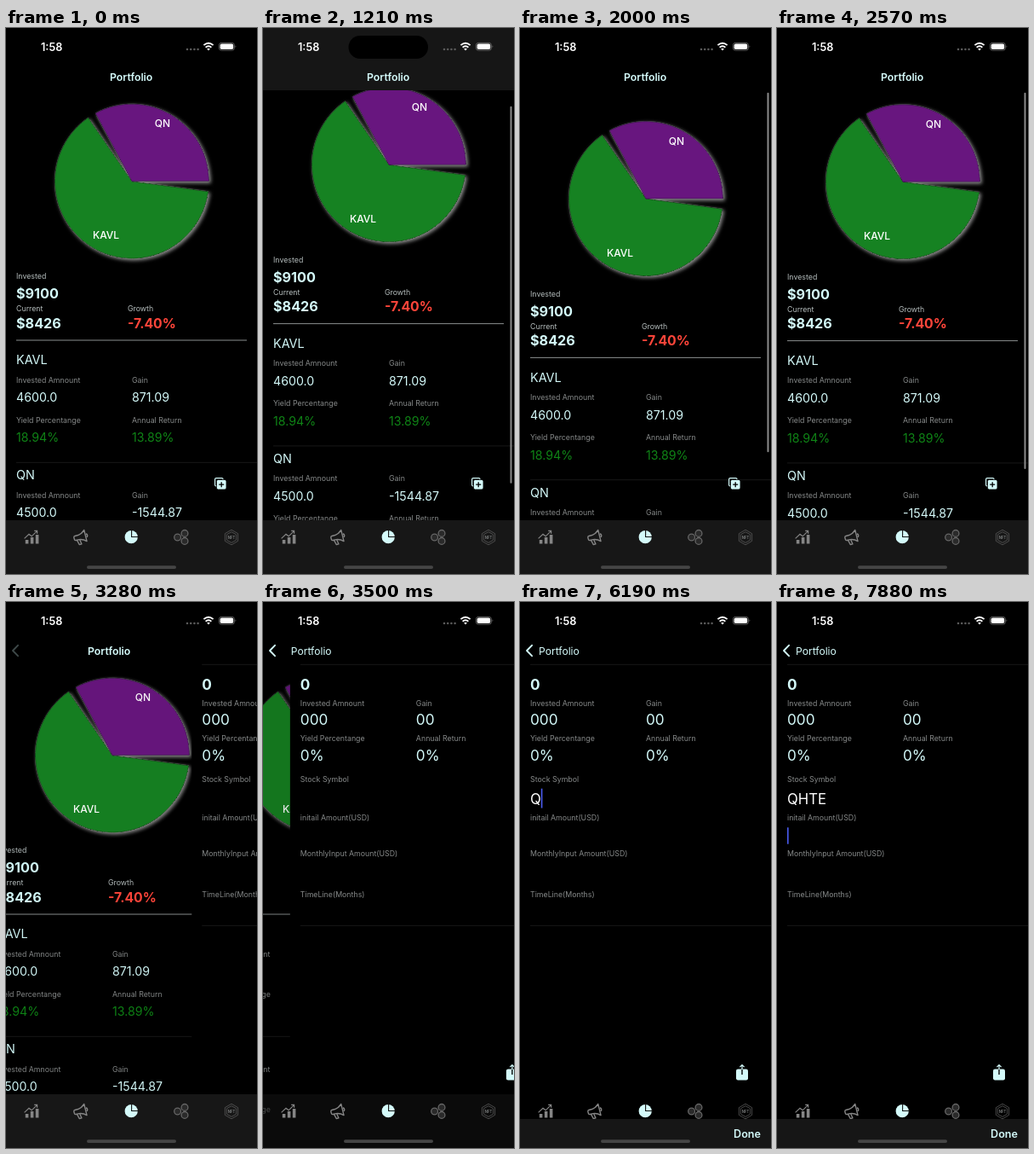
Recreate the animation shown at these times as an HTML page. Size 295 by 640 pixels, loop 8000 ms.

```html
<!DOCTYPE html>
<html lang="en">
<head>
<meta charset="utf-8">
<title>Portfolio</title>
<style>
  html, body { margin: 0; width: 100%; height: 100%; overflow: hidden; background: #000; }
  svg { display: block; width: 295px; height: 640px; }
  text { font-family: Inter, Roboto, sans-serif; fill: #d4fafa; white-space: pre; }
  .label { fill: #858888; }
  .soft { fill: #b4bcbc; }
  .bold { font-weight: 700; }
  .semi { font-weight: 600; }
  .medium { font-weight: 500; }
  .white { fill: #fff; }
  .red { fill: #ff453a; font-weight: 700; }
  .loss { fill: #ff453a; }
  .gain { fill: #0f8416; }
  .line { stroke: #1f1f1f; stroke-width: .8; }
</style>
</head>
<body>
<svg viewBox="0 0 295 640">
  <defs>
    <filter id="glow" x="-20%" y="-20%" width="140%" height="140%">
      <feDropShadow dx="1.8" dy="1.8" stdDeviation="2.1" flood-color="#fff" flood-opacity=".55"/>
    </filter>
  </defs>
  <rect width="295" height="640"/>

  <g id="home">
    <g id="list"></g>
    <rect id="bar" x="290.5" width="2" rx="1" fill="#8c8c8c"/>
    <g id="add">
      <rect x="245.6" y="527.6" width="9.4" height="9.4" rx="1.4" fill="#000" stroke="#d4fafa" stroke-width="1.2"/>
      <rect x="247.4" y="529.4" width="11.6" height="11.6" rx="2" fill="#d4fafa" stroke="#000" stroke-width=".8"/>
      <path d="M253.2 532.2v6M250.2 535.2h6" stroke="#000" stroke-width="1.3"/>
    </g>
  </g>

  <g id="detail">
    <rect width="295" height="640"/>
    <path class="line" d="M12 73.3H295M12 379.3H295"/>
    <rect id="caret" width="1.6" fill="#4a5cf0"/>
    <rect x="254" y="547.5" width="14" height="13" rx="2.2" fill="#d4fafa"/>
    <path d="M261 548v6" stroke="#000" stroke-width="1.4"/>
    <path d="M261 548v-5M258.4 545.2l2.6-2.6 2.6 2.6" fill="none" stroke="#d4fafa" stroke-width="1.2"/>
  </g>

  <rect id="navBg" width="295" height="73" fill="#161616"/>
  <rect x="100.5" y="9" width="93.5" height="27" rx="13.5"/>
  <g id="status">
    <g fill="#5a5a5a">
      <circle cx="213" cy="25" r="1.3"/><circle cx="217.2" cy="25" r="1.3"/>
      <circle cx="221.4" cy="25" r="1.3"/><circle cx="225.6" cy="25" r="1.3"/>
    </g>
    <path d="M232.4 20.2Q238 15.2 243.6 20.2M234.6 22.7Q238 19.8 241.4 22.7" fill="none" stroke="#fff" stroke-width="1.8"/>
    <path d="M236.2 24.4Q238 23 239.8 24.4L238 26.4Z" fill="#fff"/>
    <rect x="250.4" y="17.4" width="18" height="8.8" rx="2.8" fill="none" stroke="#777" stroke-width=".8"/>
    <rect x="251.6" y="18.6" width="15.6" height="6.4" rx="1.8" fill="#fff"/>
    <path d="M269.6 20.3q1.6 1.5 0 3z" fill="#777"/>
  </g>
  <path id="back" d="M14 50.8L8 57l6 6.2" fill="none" stroke="#d4fafa" stroke-width="1.9" stroke-linecap="round" stroke-linejoin="round"/>

  <rect id="tabBg" y="577" width="295" height="63" fill="#171717"/>
  <g id="tabs">
    <path d="M22.8 600h3.6v4.6h-3.6zM28.8 597h3.6v7.6h-3.6zM34.8 594h3.6v10.6h-3.6z" fill="#858585"/>
    <path d="M21.6 598.4l5.4-5 3.2 2.4 6-6M33.2 589.4h3.4v3.4" fill="none" stroke="#858585" stroke-width="1.2"/>
    <path transform="rotate(-14 88 597)" fill="none" stroke="#858585" stroke-width="1.4" stroke-linejoin="round"
      d="M81.5 593.8h3.8q4.8-.5 8.4-4.2v13.6q-3.6-3.7-8.4-4.2h-3.8q-1.5 0-1.5-1.5v-2.2q0-1.5 1.5-1.5zM82.8 599.2l1.4 5.6h2.8l-1-5.4M95 594.2q2 2.2 0 4.4"/>
    <circle cx="147.2" cy="596.7" r="7.6" fill="#d4fafa"/>
    <path d="M147.6 588V596.5H156" fill="none" stroke="#111" stroke-width="1.1"/>
    <g fill="#2a2a2a" stroke="#666" stroke-width="1.3">
      <circle cx="201.6" cy="597" r="3.9"/><circle cx="210" cy="592.4" r="3.9"/><circle cx="210" cy="601.4" r="3.9"/>
    </g>
    <path d="M265 588.2l7.6 4.4v8.8l-7.6 4.4-7.6-4.4v-8.8zM265 590.6l5.6 3.2v6.4l-5.6 3.2-5.6-3.2v-6.4z" fill="none" stroke="#5a5a5a" stroke-width=".8"/>
  </g>

  <g id="tools"><rect y="640" width="295" height="34" fill="#161616"/></g>
  <rect x="95" y="630.2" width="105" height="3.8" rx="1.9" fill="#454545"/>
</svg>

<script>
const LOOP = 8000, WIDTH = 295;
const $ = id => document.getElementById(id);
const NS = 'http://www.w3.org/2000/svg';

function make(parent, tag, attrs) {
  const el = document.createElementNS(NS, tag);
  for (const k in attrs) el.setAttribute(k, attrs[k]);
  parent.appendChild(el);
  return el;
}

// y is the middle of the capitals
function text(parent, x, y, size, str, cls = '', anchor = 'start') {
  const el = make(parent, 'text', { x, y: y + size * .364, 'font-size': size, class: cls, 'text-anchor': anchor });
  el.textContent = str;
  return el;
}

function slice(parent, from, to, fill, edge) {
  const at = a => `${148 + 90.5 * Math.cos(a * Math.PI / 180)} ${179.7 + 90.5 * Math.sin(a * Math.PI / 180)}`;
  const d = `M148 179.7L${at(from)}A90.5 90.5 0 ${to - from > 180 ? 1 : 0} 1 ${at(to)}Z`;
  make(parent, 'path', { d, fill, stroke: edge, 'stroke-width': 1 });
}

const list = $('list'), detail = $('detail');

function holding(y, name, values, cls) {
  text(list, 12, y, 14.4, name);
  [['Invested Amnount', 'Gain'], ['Yield Percentange', 'Annual Return']].forEach((row, r) =>
    row.forEach((label, c) => {
      const x = c ? 148 : 12, top = y + 23.3 + r * 47;
      text(list, x, top, 8.8, label, 'label');
      text(list, x, top + 20.7, 14.2, values[r * 2 + c], r ? cls : '');
    }));
  make(list, 'path', { d: `M12 ${y + 120.3}H295`, class: 'line' });
}

function buildList() {
  const pie = make(list, 'g', { filter: 'url(#glow)' });
  slice(pie, 7.7, 235.4, '#178223', '#0e5017');
  slice(pie, 241.8, 360, '#68187f', '#401050');
  text(list, 184, 112, 12, 'QN', 'medium white', 'middle');
  text(list, 117.5, 243, 12, 'KAVL', 'medium white', 'middle');
  text(list, 12, 291, 8.8, 'Invested', 'soft');
  text(list, 12, 311.5, 16.2, '$9100', 'bold');
  text(list, 12, 329, 8.8, 'Current', 'soft');
  text(list, 12, 346, 16.2, '$8426', 'bold');
  text(list, 143, 329, 8.8, 'Growth', 'soft');
  text(list, 143, 346, 15.8, '-7.40%', 'red');
  make(list, 'path', { d: 'M12 366H283', stroke: '#8a8f8f', 'stroke-width': 1 });
  holding(389, 'KAVL', ['4600.0', '871.09', '18.94%', '13.89%'], 'gain');
  holding(524, 'QN', ['4500.0', '-1544.87', '-34.33%', '-27.06%'], 'loss');
}

function buildDetail() {
  text(detail, 12, 97, 17.2, '0', 'bold');
  [[12, 118.5, 'Invested Amnount', '000'], [148, 118.5, 'Gain', '00'],
   [12, 160, 'Yield Percentange', '0%'], [148, 160, 'Annual Return', '0%']].forEach(([x, y, label, value]) => {
    text(detail, x, y, 8.8, label, 'label');
    text(detail, x, y + 19.7, 17.2, value);
  });
  [[207.5, 'Stock Symbol'], [253, 'initail Amount(USD)'],
   [295, 'MonthlyInput Amount(USD)'], [343, 'TimeLine(Months)']]
    .forEach(([y, label]) => text(detail, 12, y, 8.8, label, 'label'));
}

buildList();
buildDetail();
const field = text(detail, 12, 230.7, 16.7, '', 'white');
const svg = document.querySelector('svg');
const title = text(svg, 0, 57.2, 12.3, 'Portfolio', 'semi');
text($('status'), 41, 22, 12.7, '1:58', 'semi white');
text($('tabs'), 265, 597, 4.2, 'NFT', 'semi label', 'middle');
text($('tools'), 283, 657, 12.6, 'Done', 'semi', 'end');

// Each track is a list of [start time, held value]
const tracks = {
  scroll: [[0, 0], [1210, 19.4], [1330, 41], [1450, 47], [1770, 38], [1890, 6], [2000, -20.4],
           [2120, -17], [2230, -10], [2340, -5], [2450, -2], [2570, -.6], [3050, 0]],
  bar: [[0, 0], [1210, 1], [3050, 0]],
  left: [[0, 1], [3280, .74], [3390, .33], [3500, .108], [3610, .03], [3710, .003], [4000, 0]],
  tab: [[0, 1], [3390, .7], [3500, .5], [3610, .2], [3710, 0]],
  tools: [[0, 0], [5110, 13], [5220, 24], [5340, 30], [5450, 32.5], [5560, 33.6], [5660, 34]],
  typed: [[0, 0], [6190, 1], [6380, 3], [6580, 4]],
  caret: [[0, 0], [4990, 1], [5800, 0], [6190, 1], [7730, 0], [7880, 2]]
};

function held(name, t) {
  let value;
  for (const [start, v] of tracks[name]) if (t >= start) value = v;
  return value;
}

const move = (el, x, y) => el.setAttribute('transform', `translate(${x} ${y})`);

function render(t) {
  const scroll = held('scroll', t), left = held('left', t), caret = held('caret', t);

  move(list, 0, -scroll);
  move($('home'), -.3 * WIDTH * (1 - left), 0);
  $('home').style.opacity = .9 + .1 * left;
  move(detail, WIDTH * left, 0);
  $('navBg').style.opacity = scroll > 0 ? 1 : 0;
  $('tabBg').style.opacity = held('tab', t);

  const bar = $('bar');
  bar.style.opacity = held('bar', t);
  bar.setAttribute('y', 75.7 + Math.max(0, scroll) * .83);
  bar.setAttribute('height', 442 + Math.min(0, scroll));

  title.setAttribute('x', 22 + 100 * left);
  title.setAttribute('font-size', left > .5 ? 12.3 : 12.1);
  title.setAttribute('class', left > .5 ? 'semi' : '');
  $('back').style.opacity = Math.min(1, (1 - left) * 1.12);

  field.textContent = 'QHTE'.slice(0, held('typed', t));
  const mark = $('caret');
  mark.style.opacity = caret ? 1 : 0;
  mark.setAttribute('x', caret === 1 ? 12 + field.getComputedTextLength() : 12);
  mark.setAttribute('y', caret === 2 ? 264.3 : 218.7);
  mark.setAttribute('height', caret === 2 ? 19.4 : 22.8);

  move($('tools'), 0, -held('tools', t));
}

const begin = performance.now();
function tick() {
  render((performance.now() - begin) % LOOP);
  requestAnimationFrame(tick);
}
tick();
</script>
</body>
</html>
```
